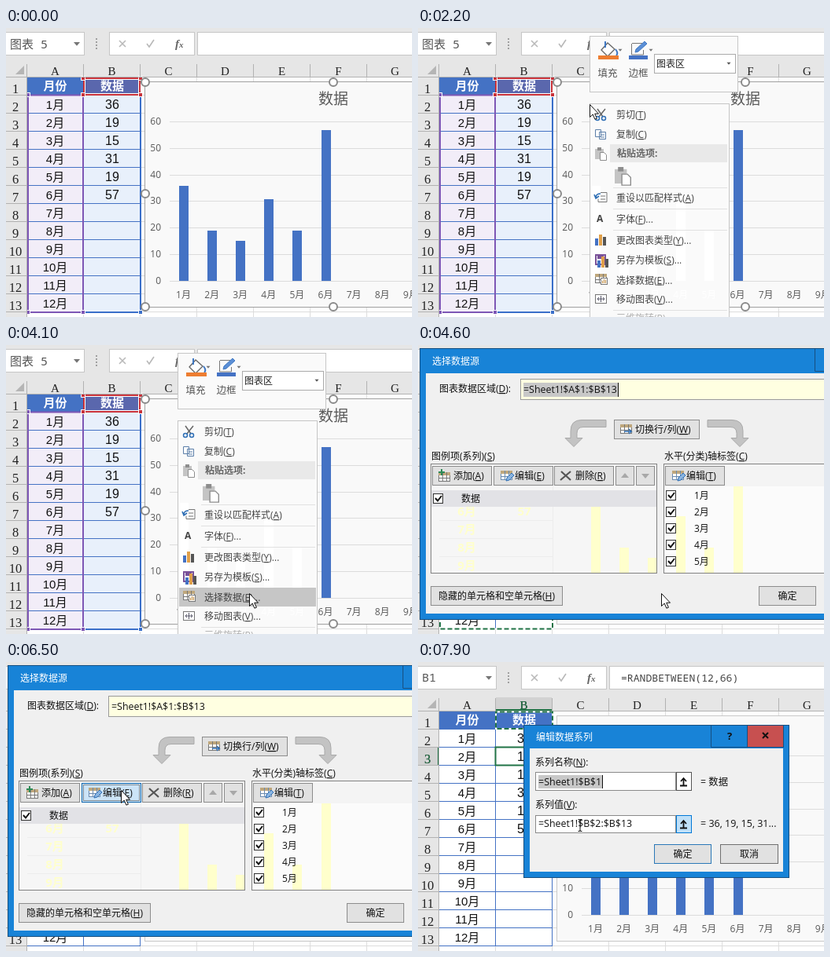
Animation of 516x368 px, one loop 8 s. Source, as an HTML page:

```html
<!DOCTYPE html>
<html lang="zh">
<head>
<meta charset="utf-8">
<title>选择数据源</title>
<style>
html, body { margin: 0; width: 100%; height: 100%; overflow: hidden; background: #fff; }
svg { display: block; width: 100vw; height: 100vh; }
text { font-family: "Open Sans", "Noto Sans CJK SC", "Noto Sans CJK", sans-serif; white-space: pre; }
.mono { font-family: "Noto Sans Mono", "Noto Sans CJK SC", "Noto Sans CJK", monospace; }
.serif { font-family: "Liberation Serif", serif; }
.cell { font-family: "Liberation Sans", "Noto Sans CJK SC", "Noto Sans CJK", sans-serif; }
.b { font-weight: 700; }
.m { text-anchor: middle; }
.e { text-anchor: end; }
</style>
</head>
<body>
<svg id="stage" viewBox="0 0 516 368" preserveAspectRatio="none"></svg>
<script>
const LOOP = 8000, STEP = 100;
const BLUE = '#4472c4', FRAME = '#1883d7', EDGE = '#174f80', GREEN = '#217346', GREY = '#757575';
const DATA = [36, 19, 15, 31, 19, 57];
const range = (n, f) => Array.from({ length: n }, (_, i) => f(i)).join('');

const rect = (x, y, w, h, fill, stroke, more = '') => stroke
  ? `<rect x="${x + .5}" y="${y + .5}" width="${w - 1}" height="${h - 1}" fill="${fill}" stroke="${stroke}" ${more}/>`
  : `<rect x="${x}" y="${y}" width="${w}" height="${h}" fill="${fill}" ${more}/>`;
const path = (d, stroke, w = 1, fill = 'none', more = '') =>
  `<path d="${d}" stroke="${stroke}" stroke-width="${w}" fill="${fill}" ${more}/>`;
const text = (x, y, s, size = 12, fill = '#111', cls = '') => {
  const body = s.replace(/\((\w)\)/, '(<tspan text-decoration="underline">$1</tspan>)');
  return `<text x="${x}" y="${y}" font-size="${size}" fill="${fill}" class="${cls}">${body}</text>`;
};
const group = (id, body, more = '') => `<g id="${id}" ${more}>${body}</g>`;
const down = (x, y, fill = GREY, r = 4) => path(`M${x - r} ${y - r / 2}h${2 * r}l${-r} ${r * 1.2}z`, 'none', 0, fill);
const button = (x, y, w, h, label, lx) => rect(x, y, w, h, '#e1e1e1', '#8c8c8c') +
  (label ? text(lx || x + w / 2, y + 17, label, 12, '#111', lx ? '' : 'm') : '');
const barX = i => 225.5 + 36.1 * i;
const bars = fill => DATA.map((v, i) => {
  const h = Math.round(v * 3.37);
  return rect(Math.round(barX(i) - 5.5), 322 - h, 12, h, fill);
}).join('');
const months = fill => range(9, i => text(barX(i), 344, `${i + 1}月`, 12, fill, 'm'));
const rowY = i => 62 + 23 * i;

function topBar() {
  return rect(0, 0, 516, 62, '#e6e6e6') +
    rect(-1, 5, 101, 30, '#fff', '#c6c6c6') + down(90, 20) +
    range(4, i => rect(114, 13 + 4 * i, 2, 2, '#a0a0a0')) +
    rect(131, 5, 109, 30, '#fff', '#c6c6c6') +
    path('M144 16l8 8m0-8l-8 8', '#b9b9b9', 1.6) +
    path('M179 20l3 4 6-9', '#b9b9b9', 1.6) +
    text(215, 25, '<tspan font-style="italic">f</tspan><tspan font-size="11" font-style="italic">x</tspan>', 15, '#666', 'serif b') +
    rect(243, 5, 280, 30, '#fff', '#c6c6c6') +
    group('nameChart', text(5, 26, '图表 5', 15, '#555', 'mono')) +
    group('nameCell', text(5, 25, 'B1', 15, '#555', 'mono') +
      text(258, 25, '=RANDBETWEEN(12,66)', 13.1, '#444', 'mono'));
}

function headers() {
  return rect(0, 62, 26, 306, '#e6e6e6') +
    path('M12 59h11v-11z', 'none', 0, '#b5b5b5') +
    group('colHot', rect(99, 45, 71, 17, '#d2d2d2') + rect(98, 60, 73, 2, GREEN) +
      rect(0, 109, 26, 22, '#d2d2d2') + rect(25, 108, 2, 24, GREEN)) +
    path('M0 62.5H516M26.5 46V368' + range(6, i => `M${98.5 + 72 * i} 46v16`) +
      range(14, i => `M0 ${rowY(i) + .5}h26`), '#b2b2b2') +
    [...'ABCDEFG'].map((c, i) => text(62.5 + 72 * i, 59.5, c, 15, '#222', 'serif m')).join('') +
    range(13, i => text(12, 83 + 23 * i, `${i + 1}`, 16.5, '#222', 'serif m')) +
    group('headHot', text(134.5, 59.5, 'B', 15, GREEN, 'serif m') + text(12, 129, '3', 16.5, GREEN, 'serif m'));
}

function cells() {
  const corner = (x, y, c) => rect(x - 3, y - 3, 6, 6, '#fff') + rect(x - 2, y - 2, 4, 4, c);
  return path(range(14, i => `M171 ${rowY(i) + .5}H516`) + range(6, i => `M${98.5 + 72 * i} 62V368`), '#dcdcdc') +
    group('fills', rect(27, 85, 71, 276, '#f2edf8') + rect(99, 85, 72, 276, '#e8f0fb')) +
    rect(27, 63, 144, 22, BLUE) +
    group('fillB1', rect(99, 63, 72, 22, '#5a67ad')) +
    path(range(13, i => `M27 ${rowY(i + 1) + .5}H171`) + 'M98.5 85V361M170.5 85V361M26.5 63V361', BLUE) +
    text(62.5, 79, '月份', 15, '#fff', 'm b') + text(135, 79, '数据', 15, '#fff', 'm b') +
    range(12, i => text(62.5, 102.5 + 23 * i, `${i + 1}月`, 15, '#111', 'm cell')) +
    DATA.map((v, i) => text(135, 102.5 + 23 * i, `${v}`, 16, '#111', 'm cell')).join('') +
    group('marks',
      path('M28 85.5H98V362H28z', '#7e57b5', 2) +
      path('M99 362H171V86', '#3a6fc9', 2) +
      path('M100.500 65.500H168.500V83.500H100.500z', '#fff') +
      path('M99 64H170V85H99z', '#c8323a', 2) +
      [[98, 64], [171, 64], [98, 85], [171, 85]].map(p => corner(...p, '#c8323a')).join('') +
      [[28, 85], [28, 362], [98, 362]].map(p => corner(...p, '#7e57b5')).join('') + corner(171, 362, '#3a6fc9')) +
    group('cellB3', rect(98, 108, 73, 24, 'none', GREEN, 'stroke-width="2"'));
}

function chart() {
  return rect(176, 68, 360, 288, '#f9f9f9', '#c8c8c8') +
    path(range(7, i => `M208 ${Math.round(322 - 33.85 * i) + .5}H516`), '#dcdcdc') +
    range(7, i => text(197, 326 - 33.85 * i, `${i * 10}`, 12, '#595959', 'e')) +
    text(416, 96.5, '数据', 19, '#595959', 'm') + bars(BLUE) + months('#595959') +
    group('handles', path('M520 68.500H176.500V355.500H520', '#a0a0a0') +
      [[177, 69], [416, 69], [177, 211], [177, 355], [416, 355]].map(([x, y]) =>
        `<circle cx="${x}" cy="${y}" r="5" fill="#fff" stroke="#8a8a8a" stroke-width="2"/>`).join(''));
}

const ITEMS = [
  ['剪切(T)', 98, 123], ['复制(C)', 123, 148], ['重设以匹配样式(A)', 204, 229], ['字体(F)...', 231, 256],
  ['更改图表类型(Y)...', 258, 283], ['另存为模板(S)...', 283, 308], ['选择数据(E)...', 309, 333], ['移动图表(V)...', 333, 358]
];
const clipboard = (x, y, s, c) => `<g transform="translate(${x} ${y}) scale(${s})">` +
  rect(0, 2, 11, 13, c) + rect(3, 0, 5, 4, '#8d8d8d') + path('M6.5 6.5h5l3 3v7h-8z', '#8d8d8d', 1, '#fff') + '</g>';
const columns = (x, y) => rect(x, y + 5, 4, 9, BLUE) + rect(x + 5, y, 4, 14, '#e0a04a') + rect(x + 10, y + 3, 4, 11, '#555');
const grid = (x, y, c = '#777') => rect(x, y, 15, 12, '#fff', c) + rect(x, y, 15, 4, '#bfa77c') +
  path(`M${x} ${y + 7.5}h15M${x + 5.5} ${y}v12M${x + 10.5} ${y}v12`, c);

function menu() {
  const bar = rect(218, 10, 189, 72, '#fafafa', '#c6c6c6') +
    path('M233 28l8-9 9 8-9 9z', '#666', 1.3, '#fff') + path('M238 17v8M251 27q4 5 1 8', '#3f78c3', 2) +
    rect(229, 35, 26, 5, '#ed7d31') + down(257, 28, GREY, 2.5) + text(241, 62, '填充', 12.5, '#555', 'm') +
    path('M272 19.5h13M271.5 20v14h15v-6', '#777') + path('M276 31l1-4 11-10 3 3-11 10z', '#3f78c3', 1, '#5b8fd6') +
    rect(268, 35, 24, 5, BLUE) + down(296, 28, GREY, 2.5) + text(280, 62, '边框', 12.5, '#555', 'm') +
    rect(300, 33, 104, 25, '#fff', '#ababab') + text(303, 49.5, '图表区', 12, '#222') + down(395, 45, '#555', 2.5);
  const icons = path('M228 103l7 10M238 103l-8 10', '#666', 1.5) +
    '<g fill="none" stroke="#2f6fb5" stroke-width="1.5"><circle cx="228" cy="115" r="2.5"/><circle cx="236" cy="115" r="2.5"/></g>' +
    path('M225.500 129.500h7v9h-7zM230.500 132.500h8v9h-8zM232 136h5M232 139h5', '#5b7ea8', 1, '#fff') +
    clipboard(225, 152, 1, '#c4c4c4') + clipboard(250, 177, 1.4, '#c4c4c4') +
    path('M232 209.500h8v12h-11v-4M232 214h6M232 218h6', '#777') + path('M226 216q0-5 6-5M224 212l2 5 4-3', '#2f6fb5', 1.6) +
    text(227, 247, 'A', 12, '#444', 'b') + columns(225, 263) +
    path('M226 289h12v12h-12z', '#7a5299', 2, '#fff') + rect(228, 290, 8, 4, '#7a5299') + columns(228, 291) +
    grid(225, 313) + rect(232, 318, 9, 9, '#fff', '#777') + path('M234.500 325v-3M236.500 325v-5M238.500 325v-4', '#bf8a3c') +
    rect(225, 339, 15, 12, '#fff', '#777') + path('M228 345h9M232.500 341v8M230 343l-2 2 2 2M235 343l2 2-2 2', '#556');
  return bar + rect(218, 96, 178, 280, '#fafafa', '#c6c6c6') +
    `<g clip-path="url(#menuClip)">${bars('#fff')}${months('#fff')}</g>` +
    rect(244, 148, 149, 23, '#e9e9e9') + rect(220, 0, 174, 25, '#c6c6c6', null, 'id="rowHot"') +
    path('M248 203.500H393M248 230.500H393M248 257.500H393M248 359.500H393', '#e1e1e1') + icons +
    text(253, 164, '粘贴选项:', 12, '#666', 'b') +
    ITEMS.map(([s, a, b]) => text(252, (a + b) / 2 + 4.5, s, 12, '#444')).join('') +
    text(252, 374, '三维旋转(R)...', 12, '#b0b0b0');
}

const check = y => rect(19, y, 13, 13, '#fff', '#333') + path(`M22 ${y + 6}l3 3.500 5-6.500`, '#111', 2);
const pencil = (x, y) => grid(x, y, '#6a8bb0') + path(`M${x + 7} ${y + 13}l1-4 6-6 3 3-6 6z`, '#2f6fb5', 1, '#8ab4e0');

function ghost() {
  const c = '#ffffcc';
  return `<g clip-path="url(#listClip)">` + rect(17, 180, 286, 110, '#f6f6f6') + rect(313, 180, 210, 110, '#fbfbfb') +
    range(4, i => text(62, 217 + 23 * i, `${i + 6}月`, 15, c, 'm b')) + text(135, 217, '57', 15, c, 'm b') +
    path(range(4, i => `M27 ${rowY(i + 7) + .5}H171`) + 'M171.500 180V290', '#ededed') +
    bars(c) + '</g>';
}

function sourceDialog() {
  const arrow = path('M239 95.500H208q-14 0-14 14v9h-7l11 11 11-11h-7v-6q0-8 8-8h29z', '#a9a9a9', 1, '#c3c3c3');
  return rect(2, 4, 520, 346, FRAME, EDGE) + rect(10, 36, 512, 306, '#f0f0f0') +
    path('M504.500 4V33.500H516', EDGE) + text(18, 25, '选择数据源', 12, '#fff') +
    text(27, 60, '图表数据区域(D):') + rect(130, 43, 400, 27, '#ffffe1', '#9a9a9a') +
    group('rangeSel', rect(134, 48, 120, 18, '#c8c8c8')) + text(134, 61, '=Sheet1!$A$1:$B$13', 12.4) +
    group('caret', rect(254, 48, 1, 18, '#111')) +
    arrow + `<g transform="translate(607 0) scale(-1 1)">${arrow}</g>` +
    button(249, 95, 109, 25, '切换行/列(W)', 276) + grid(257, 101) + path('M262 110h9l-3-3m3 3l-3 3', '#2f6fb5', 1.4) +
    text(17, 146, '图例项(系列)(S)') + text(313, 146, '水平(分类)轴标签(C)') +
    rect(16, 151, 288, 140, '#f4f4f4', '#828282') + rect(312, 151, 220, 140, '#f4f4f4', '#828282') + ghost() +
    button(18, 154, 76, 25, '添加(A)', 45) + grid(26, 162) + path('M30 158v8M26 162h8', '#2e8b57', 2) +
    button(96, 154, 76, 25) +
    group('editHot', rect(96, 154, 76, 25, '#cce4f7', '#0a64ad')) +
    group('editFocus', rect(98, 156, 72, 21, 'none', '#333', 'stroke-dasharray="1 1"')) +
    text(123, 171, '编辑(E)') + pencil(105, 160) +
    button(173, 154, 76, 25, '删除(R)', 200) + path('M182 161l12 11M194 161l-13 11', '#555', 2.2) +
    button(251, 154, 24, 25) + path('M258 169h10l-5-6z', 'none', 0, '#a8a8a8') +
    button(277, 154, 24, 25) + path('M284 164h10l-5 6z', 'none', 0, '#a8a8a8') +
    rect(17, 185, 286, 21, '#e2e2e6') + check(189) + text(55, 200, '数据') +
    button(314, 154, 76, 25, '编辑(T)', 341) + pencil(323, 160) +
    range(5, i => `<g transform="translate(296 0)">${check(185 + 21 * i)}</g>` + text(351, 196 + 21 * i, `${i + 1}月`)) +
    button(16, 307, 168, 25, '隐藏的单元格和空单元格(H)', 26) + button(433, 307, 73, 25, '确定');
}

function seriesDialog() {
  const pick = path('M337.500 157V149M334 152l3.500-4 3.500 4M333 157.500h9', '#111', 1.8);
  return rect(134, 80, 338, 195, FRAME, EDGE) + rect(142, 110, 322, 157, '#f0f0f0') +
    text(150, 99.5, '编辑数据系列', 12, '#fff') + text(396, 99, '?', 13, '#111', 'm b') +
    path('M372.500 80V108.500H418', EDGE) +
    rect(418, 80, 47, 29, '#c75050', EDGE) + path('M438 90l7 7m0-7l-7 7', '#111', 2) +
    text(149, 132, '系列名称(N):') + rect(149, 140, 179, 24, '#fff', '#8a8a8a') +
    rect(153, 144, 81, 17, '#c8c8c8') + rect(234, 144, 1, 17, '#111') + text(153, 157, '=Sheet1!$B$1', 12.5) +
    rect(328, 140, 20, 24, '#fff', '#555') + pick + text(359, 157, '= 数据', 12.4) +
    text(149, 186, '系列值(V):') + rect(149, 195, 179, 23, '#fff', '#8a8a8a') + text(153, 210, '=Sheet1!$B$2:$B$13', 12.4) +
    rect(328, 195, 20, 23, '#fff', '#555') + group('pickHot', rect(328, 195, 20, 23, '#bfe0f8', '#0078d7')) +
    `<g transform="translate(0 54)">${pick}</g>` + text(359, 210, '= 36, 19, 15, 31...', 12.5) +
    rect(300, 232, 73, 25, '#e1e1e1', '#2a78b8') + text(336.5, 249, '确定', 12, '#111', 'm') +
    rect(384, 232, 74, 25, '#e1e1e1', '#707070') + text(421, 249, '取消', 12, '#111', 'm');
}

const ants = (id, d) => group(id, path(d, '#fff', 2) + path(d, GREEN, 2, 'none', 'stroke-dasharray="6 3"'));

const stage = document.getElementById('stage');
stage.innerHTML = `<defs><clipPath id="menuClip">${rect(219, 97, 176, 271, '#000')}</clipPath>
  <clipPath id="listClip">${rect(17, 180, 286, 110, '#000')}${rect(313, 180, 203, 110, '#000')}</clipPath></defs>` +
  rect(0, 0, 516, 368, '#fff') + topBar() + cells() + headers() + chart() +
  ants('antsAll', 'M28 63H171V361.500H28z') + ants('antsB1', 'M99 63.500H171V85H99z') +
  group('tip', rect(218, 119, 53, 20, '#fff', '#b4b4b4') + text(244.5, 133.5, '图表区', 12, '#444', 'm')) +
  group('menu', menu()) + group('source', sourceDialog()) + group('series', seriesDialog()) +
  group('arrow', path('M.5 .5V16.500L4.200 13l2.700 6.200 2.500-1-2.700-6H11.500z', '#111', 1, '#fff')) +
  group('beam', path('M-2.500-7.500h2l.5 1 .5-1h2M0-7V7M-2.500 7.500h2l.5-1 .5 1h2', '#111', 1));

const ui = {};
stage.querySelectorAll('[id]').forEach(n => ui[n.id] = n);
const show = (id, on) => ui[id].setAttribute('display', on ? 'inline' : 'none');

// time, x, y
const TRACK = [
  [400, 440, 66], [700, 330, 84], [1000, 212, 96], [1200, 218, 97], [2900, 218, 97], [3300, 279, 189],
  [3800, 309, 293], [4100, 309, 316], [5200, 309, 317], [6100, 146, 163], [6700, 146, 163],
  [7000, 180, 204], [7400, 334, 198], [7500, 334, 198], [7900, 206, 208]
];
function pointer(t) {
  const i = TRACK.findIndex(k => k[0] > t);
  if (i < 0) return TRACK[TRACK.length - 1].slice(1);
  if (i === 0) return TRACK[0].slice(1);
  const [a, ax, ay] = TRACK[i - 1], [b, bx, by] = TRACK[i], p = (t - a) / (b - a);
  return [ax + (bx - ax) * p, ay + (by - ay) * p];
}

function draw(time) {
  const t = Math.floor(time / STEP) * STEP;
  const within = (a, b) => t >= a && t < b;
  const [x, y] = pointer(t);
  const picked = t < 4400, source = within(4500, 6600), series = t >= 6700, cell = t >= 6600;
  ['fills', 'fillB1', 'marks', 'handles', 'nameChart'].forEach(id => show(id, picked));
  ['nameCell', 'colHot', 'headHot', 'cellB3'].forEach(id => show(id, cell));
  show('antsAll', within(4400, 6400));
  show('antsB1', series);
  for (const id of ['antsAll', 'antsB1'])
    ui[id].lastChild.setAttribute('stroke-dashoffset', -(t / STEP * 2) % 9);

  show('tip', within(1200, 1900));
  show('menu', within(2100, 4400));
  ui.menu.setAttribute('opacity', t < 2200 ? .5 : 1);
  const hot = t >= 3000 && ITEMS.find(r => y >= r[1] && y < r[2]);
  show('rowHot', hot);
  if (hot) {
    ui.rowHot.setAttribute('y', hot[1]);
    ui.rowHot.setAttribute('height', hot[2] - hot[1]);
  }

  show('source', source);
  show('rangeSel', t < 6400);
  show('caret', t < 6400 && t % 1000 >= 500);
  show('editHot', x >= 96 && x < 172 && y >= 154 && y < 179);
  show('editFocus', t >= 6400);
  show('series', series);
  show('pickHot', t >= 7400);

  const beam = series && x > 149 && x < 327 && (y > 195 && y < 218 || y > 140 && y < 164);
  show('arrow', t >= 400 && !beam);
  show('beam', beam);
  ui[beam ? 'beam' : 'arrow'].setAttribute('transform', `translate(${Math.round(x)} ${Math.round(y)})`);
}

const start = performance.now();
function tick(now) {
  draw(Math.max(0, now - start) % LOOP);
  requestAnimationFrame(tick);
}
draw(0);
requestAnimationFrame(tick);
</script>
</body>
</html>
```
